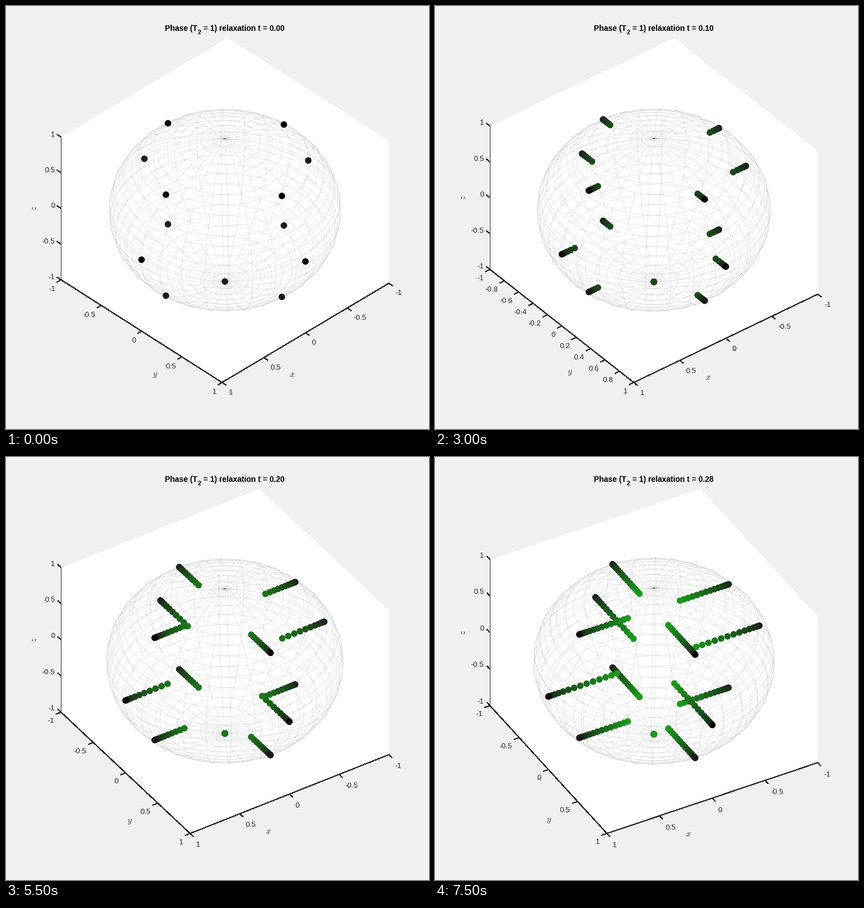
Animation of 748x748 px, one loop 8 s. Source, as a matplotlib script:

```python
import numpy as np
import matplotlib.pyplot as plt
from matplotlib.animation import FuncAnimation
from matplotlib.collections import LineCollection

SIZE, DPI = 748, 100
PT = 72 / DPI                                   # points per pixel
LEFT, RIGHT = 0.13 * SIZE, 0.905 * SIZE         # extent of the projected cube
TOP, BOTTOM = 0.075 * SIZE, 0.89 * SIZE
FRAMES, INTERVAL = 16, 500
INK = "#262626"
R = np.sqrt(0.5)                                # sin and cos of the 45 degree elevation

plt.rcParams.update({"font.family": "Liberation Sans", "mathtext.fontset": "cm"})
fig = plt.figure(figsize=(SIZE / DPI, SIZE / DPI), dpi=DPI, facecolor="#f0f0f0")
ax = fig.add_axes([0, 0, 1, 1])


class View:
    """Orthographic view of the cube [-1, 1]^3, stretched to fill the box."""

    def __init__(self, deg):
        self.s, self.c = np.sin(np.radians(deg)), np.cos(np.radians(deg))
        total = self.s + self.c
        self.kx = (RIGHT - LEFT) / 2 / total
        self.ky = (BOTTOM - TOP) / 2 / (R * (total + 1))

    def front(self, p):
        return p[..., 0] * self.s + p[..., 1] * self.c

    def depth(self, p):
        return R * (self.front(p) + p[..., 2])

    def __call__(self, p):
        p = np.asarray(p, float)
        u = (LEFT + RIGHT) / 2 + self.kx * (p[..., 1] * self.s - p[..., 0] * self.c)
        v = (TOP + BOTTOM) / 2 + self.ky * R * (self.front(p) - p[..., 2])
        return np.stack([u, v], -1)


def sphere_lines(n=30):
    lon = np.linspace(-np.pi, np.pi, n + 1)
    lat = np.linspace(-np.pi / 2, np.pi / 2, n + 1)
    lon, lat = np.meshgrid(lon, lat)
    grid = np.stack([np.cos(lat) * np.cos(lon), np.cos(lat) * np.sin(lon), np.sin(lat)], -1)
    return [grid[i] for i in range(1, n)] + [grid[:, j] for j in range(n)]


def start_points():
    pts = [(0, 0, -1)]
    for z, r in ((-R, R), (0, 1), (R, R)):
        pts += [(r, 0, z), (-r, 0, z), (0, r, z), (0, -r, z)]
    return np.array(pts)


MESH = sphere_lines()
POINTS = start_points()


def text(x, y, s, px=13.3, color=INK, **kw):
    ax.text(x, y, s, fontsize=px * PT, color=color, va="baseline", **kw)


def title(t):
    bold = dict(color="black", weight="bold", ha="left")
    text(281, 44, "Phase (T", 13.8, **bold)
    text(338.5, 50, "2", 11.5, **bold)
    text(349, 44, f"= 1) relaxation t = {t:.2f}", 13.8, **bold)


def draw_axis(view, start, axis, step, out, offset, ha):
    """Edge line, ticks pointing along `out`, and numbers beside them."""
    lines = []
    for value in np.arange(-1, 1 + step / 2, step):
        p = np.array(start, float)
        p[axis] = value
        a, b = view([p, p + 0.05 * np.array(out)])
        lines.append([a, b])
        text(a[0] + offset[0], a[1] + offset[1] + 4.8, f"{round(value, 1) + 0:g}", ha=ha)
    ends = np.array([start, start], float)
    ends[:, axis] = -1, 1
    lines.append(view(ends))
    ax.add_collection(LineCollection(lines, colors=INK, linewidths=PT,
                                     antialiaseds=False, zorder=2))
    return view(ends).mean(0)


def draw_axes(view, deg, y_step):
    corners = [(1, -1, 1), (-1, -1, 1), (-1, 1, 1), (-1, 1, -1), (1, 1, -1), (1, -1, -1)]
    ax.fill(*view(corners).T, color="white", lw=0, zorder=0)

    turn, rest = 44 - deg, deg - 29
    mx = draw_axis(view, (0, 1, -1), 0, 0.5, (0, 1, 0),
                   (11.5 - 0.09 * turn, 16 + 0.25 * turn), "left")
    my = draw_axis(view, (1, 0, -1), 1, y_step, (1, 0, 0),
                   (-10 - 0.2 * turn, 15.5 - 0.13 * turn), "right")
    mz = draw_axis(view, (1, -1, 0), 2, 0.5, (0, -1, 0),
                   (-10.5, -5.5 - 0.2 * turn), "right")
    text(mx[0] - 43 + 1.3 * rest, mx[1] + 67.5 + 0.7 * rest, "$x$", 14.7, ha="center")
    text(my[0] + 1.1 + 1.5 * rest, my[1] + 92 - 0.8 * rest, "$y$", 14.7, ha="center")
    text(54, mz[1], "$z$", 14.7, ha="center", rotation=90, rotation_mode="anchor")


def draw_dots(view, count):
    n = np.arange(count)
    shrink = np.exp(-0.005 * n * (n + 1))
    pos = np.repeat(POINTS[None], count, 0)
    pos[..., :2] *= shrink[:, None, None]
    depth = view.depth(pos)

    rgb = np.zeros(pos.shape)
    rgb[..., 1] = 0.04 * n[:, None]
    # everything behind the sphere's near side is veiled by its faint white skin
    veiled = (n[:, None] > 0) | (depth <= 0)
    rgb[veiled] = 0.1 + 0.9 * rgb[veiled]

    order = np.argsort(depth.ravel(), kind="stable")
    xy = view(pos).reshape(-1, 2)[order]
    ax.scatter(*xy.T, s=(11.5 * PT) ** 2, c=rgb.reshape(-1, 3)[order], linewidths=0, zorder=4)


def draw(k):
    ax.clear()
    ax.axis("off")
    ax.set_xlim(0, SIZE)
    ax.set_ylim(SIZE, 0)
    deg, count = 44 - k, max(k, 1)
    view = View(deg)
    draw_axes(view, deg, 0.2 if 2 <= k <= 8 else 0.5)
    ax.add_collection(LineCollection([view(m) for m in MESH], colors=(0, 0, 0, 0.1),
                                     linewidths=PT * 0.9, zorder=3))
    draw_dots(view, count)
    title(0.02 * (count - 1))
    return []


anim = FuncAnimation(fig, draw, frames=FRAMES, interval=INTERVAL,
                     repeat=True, repeat_delay=0, blit=False)
plt.show()
```
